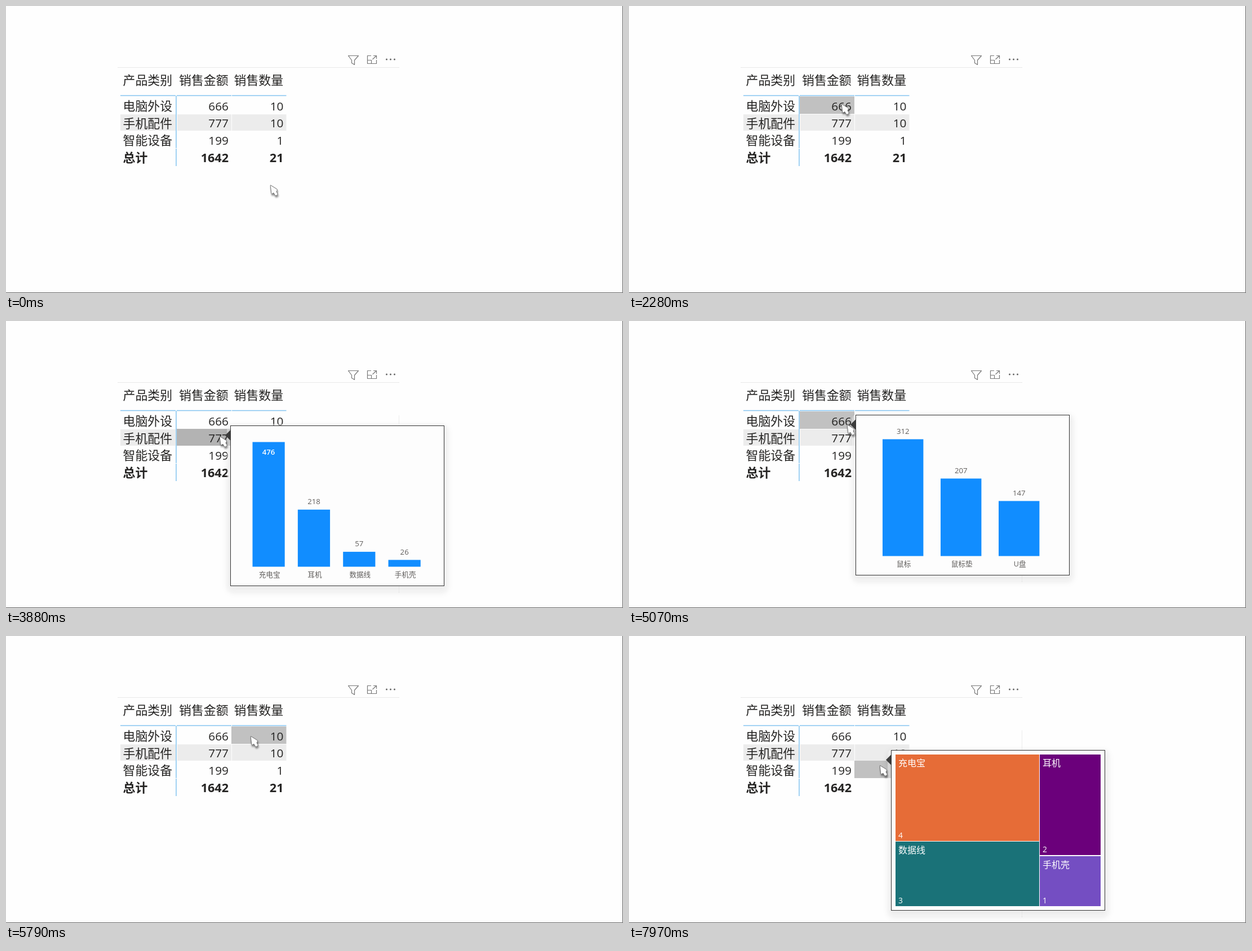
These frames come from a looping animation (1095x511 px, 8000 ms). An HTML page:

```html
<!DOCTYPE html>
<html lang="zh-CN">
<head>
<meta charset="utf-8">
<title>Table with report tooltips</title>
<style>
  html, body { margin: 0; width: 100%; height: 100%; overflow: hidden; background: #fefefe; }
  svg { display: block; width: 1095px; height: 511px; }
  text { font-family: "Open Sans", "Noto Sans CJK SC", "Noto Sans CJK", sans-serif; }
  .box { filter: drop-shadow(0 3px 5px rgba(0, 0, 0, .13)); }
  .pointer { filter: drop-shadow(1px 3px 1.5px rgba(0, 0, 0, .45)); }
</style>
</head>
<body>
<svg id="stage" viewBox="0 0 1095 511"></svg>
<script>
const LOOP = 8000, STEP = 120;
const INK = '#252423', GREY = '#605e5c', BLUE = '#118dff', RULE = '#83c3f0';

const ROWS = [['电脑外设', 666, 10], ['手机配件', 777, 10], ['智能设备', 199, 1], ['总计', 1642, 21]];
const COLUMNS = [[303, 400], [400, 497.5]];
const ROW_EDGES = [161, 192, 222, 253, 285];

const mouseBars = { x: 48, pitch: 103, width: 72.4, scale: 208 / 312,
  items: [['鼠标', 312], ['鼠标垫', 207], ['U盘', 147]] };
const phoneBars = { x: 39.5, pitch: 80.35, width: 57.2, scale: 222 / 476,
  items: [['充电宝', 476], ['耳机', 218], ['数据线', 57], ['手机壳', 26]] };
// Tiles: label, value, colour, left, top, right, bottom
const mouseTree = [['鼠标', 4, '#d9b300', 8, 9, 262, 162], ['U盘', 3, BLUE, 8, 164, 262, 278],
  ['鼠标垫', 3, '#d64550', 264, 9, 372, 278]];
const phoneTree = [['充电宝', 4, '#e66c37', 8, 8, 263, 162], ['数据线', 3, '#1a7278', 8, 163, 263, 278],
  ['耳机', 2, '#6b007b', 264, 8, 372, 187], ['手机壳', 1, '#744ec2', 264, 189, 372, 278]];

// Pointer moves: start time, number of steps, destination
const MOVES = [
  [240, 2, 453, 334], [480, 1, 442, 320], [600, 1, 447, 311], [1090, 1, 455, 325],
  [1320, 7, 389, 197], [2160, 1, 379, 177], [2280, 1, 377, 174],
  [3640, 1, 379, 198], [3760, 1, 379, 205],
  [4830, 1, 381, 190], [4950, 1, 383, 186], [5070, 1, 387, 184], [5190, 2, 400, 185], [5420, 2, 434, 178],
  [6150, 1, 435, 179], [6390, 2, 453, 179], [6750, 2, 455, 194],
  [7850, 1, 446, 223], [7970, 1, 445, 230]
];
const TOOLTIPS = [
  { from: 2780, to: 3640, x: 396, y: 155, bars: mouseBars, fadeIn: true },
  { from: 3760, to: 4830, x: 398, y: 186, bars: phoneBars, fadeIn: true },
  { from: 4950, to: 5310, x: 402, y: 167, bars: mouseBars, fadeIn: true },
  { from: 5310, to: 5790, x: 418, y: 166, tiles: mouseTree, entered: 5540, fadeOut: true },
  { from: 7360, to: 7850, x: 474, y: 175, tiles: phoneTree },
  { from: 7850, to: 8000, x: 465, y: 203, tiles: phoneTree }
];

const rect = (left, top, right, bottom, fill, extra = '') =>
  `<rect x="${left}" y="${top}" width="${right - left}" height="${bottom - top}" fill="${fill}" ${extra}/>`;
const text = (value, x, y, size, fill = INK, anchor = 'start', weight = 400) =>
  `<text x="${x}" y="${y}" font-size="${size}" fill="${fill}" text-anchor="${anchor}" font-weight="${weight}">${value}</text>`;
const path = (d, stroke, width = 1, fill = 'none') =>
  `<path d="${d}" stroke="${stroke}" stroke-width="${width}" fill="${fill}" stroke-linejoin="round"/>`;

function toolbar(dx, dy, backed) {
  const backs = [[602, 630], [635, 663], [668, 691]].map(([l, r]) => rect(l, 86, r, 107, '#fefefe')).join('');
  const dots = [675.5, 682.5, 689.5].map(x => `<circle cx="${x}" cy="95" r="1.5" fill="#666"/>`).join('');
  return `<g transform="translate(${dx} ${dy})">${backed ? backs : ''}
    ${path('M607.5 88.5H625.5L618.5 96.5V104.5L613.5 101.5V96.5Z', '#777', 1.2)}
    ${path('M648 88.5H641.5V102.5H657.5V96M641.5 96.5H648.5V102.5M650.5 95L657.5 88.5M652 88.5H657.5V94', '#777', 1.2)}
    ${dots}</g>`;
}

function table(hover) {
  let out = rect(203, 193, 301, 222, '#ececec');
  for (const [left, right] of COLUMNS) out += rect(left + 1, 193, right, 222, '#ececec');
  if (hover) {
    const [left, right] = COLUMNS[hover.column];
    out += rect(left, ROW_EDGES[hover.row], right, ROW_EDGES[hover.row + 1], hover.row === 1 ? '#b3b3b3' : '#c1c1c1');
  }
  out += path('M203 159.5H301M303 159.5H400M401 159.5H497.5', RULE, 1.6);
  out += path('M302 160V253M302 254V285', RULE, 1.5);
  ['产品类别', '销售金额', '销售数量'].forEach((label, i) => out += text(label, [207.5, 307, 404.5][i], 140, 21.9));
  ROWS.forEach(([label, amount, count], i) => {
    const y = 185.7 + i * 30.7, total = i === 3, size = total ? 21.6 : 20.8, weight = total ? 700 : 400;
    out += text(label, 207.5, y + .3, 21.9, INK, 'start', weight);
    out += text(amount, 395, y, size, INK, 'end', weight) + text(count, 492.5, y, size, INK, 'end', weight);
  });
  return out;
}

function barChart({ x, pitch, width, scale, items }) {
  const base = 251.5;
  return items.map(([label, value], i) => {
    const left = x + i * pitch, middle = left + width / 2, top = base - value * scale;
    const inside = top < 40;
    return rect(left, top, left + width, base, BLUE)
      + text(value, middle, inside ? top + 22.5 : top - 9.5, 13.2, inside ? '#fff' : GREY, 'middle', inside ? 600 : 400)
      + text(label, middle + 1.5, base + 18, 12.6, GREY, 'middle');
  }).join('');
}

const treemap = tiles => tiles.map(([label, value, fill, left, top, right, bottom]) =>
  rect(left, top, right, bottom, fill)
  + text(label, left + 5, top + 21, 16, '#fff')
  + text(value, left + 5, bottom - 5, 13.8, '#fff')).join('');

function tooltip(tip, t) {
  const faded = tip.fadeIn && t < tip.from + STEP || tip.fadeOut && t >= tip.to - STEP;
  const entered = t >= tip.entered;
  const edge = entered ? '' : path(`M697.5 168V${tip.y + 298}`, '#ededed');
  return `<g opacity="${faded ? .5 : 1}">${edge}<g transform="translate(${tip.x} ${tip.y})">
    <g class="box">${rect(-6, -3, 387, 296, '#f5f5f5', 'rx="12" opacity=".45"')}
    ${path('M0 8.5L-9 17.5L0 26.5Z', 'none', 0, '#3b3b3b')}
    ${rect(.5, .5, 379.5, 285.5, '#fdfdfd', 'stroke="#333"')}</g>
    ${tip.bars ? barChart(tip.bars) : treemap(tip.tiles)}
    ${entered ? toolbar(-319, -77, true) : ''}</g></g>`;
}

function pointerAt(t) {
  let x = 469, y = 318.5;
  for (const [start, steps, toX, toY] of MOVES) {
    if (t < start) break;
    const p = Math.min(1, (Math.floor((t - start) / STEP) + 1) / steps);
    const eased = steps > 2 ? p * p * (3 - 2 * p) : p;
    x += (toX - x) * eased;
    y += (toY - y) * eased;
  }
  return { x, y };
}

function cellAt({ x, y }) {
  const column = COLUMNS.findIndex(([left, right]) => x >= left && x < right);
  const row = ROW_EDGES.findIndex((top, i) => y >= top && y < ROW_EDGES[i + 1]);
  return column < 0 || row < 0 ? null : { column, row };
}

function scene(t) {
  const pointer = pointerAt(t);
  const tip = TOOLTIPS.find(({ from, to }) => t >= from && t < to);
  const entered = tip && t >= tip.entered;
  return table(entered ? null : cellAt(pointer))
    + (entered ? '' : path('M198 109.5H698', '#e8e8e8') + toolbar(0, 0))
    + path('M1094.5 0V510.5H0', '#606060')
    + (tip ? tooltip(tip, t) : '')
    + `<g class="pointer" transform="translate(${pointer.x} ${pointer.y})">
      ${path('M.5 .5Q0 0 .3 2L1.8 15Q2.2 17 4 15.5L6 14.3L8 18Q9 20 11.3 18.7Q14 17.5 13 15.5L11 12L12 10.5Q13 8.5 11.5 7.3Z', '#707070', 1, '#fdfdfd')}</g>`;
}

const stage = document.getElementById('stage');
const origin = performance.now();
let shown = '';
function draw() {
  const next = scene((performance.now() - origin) % LOOP);
  if (next !== shown) stage.innerHTML = shown = next;
  requestAnimationFrame(draw);
}
draw();
</script>
</body>
</html>
```
